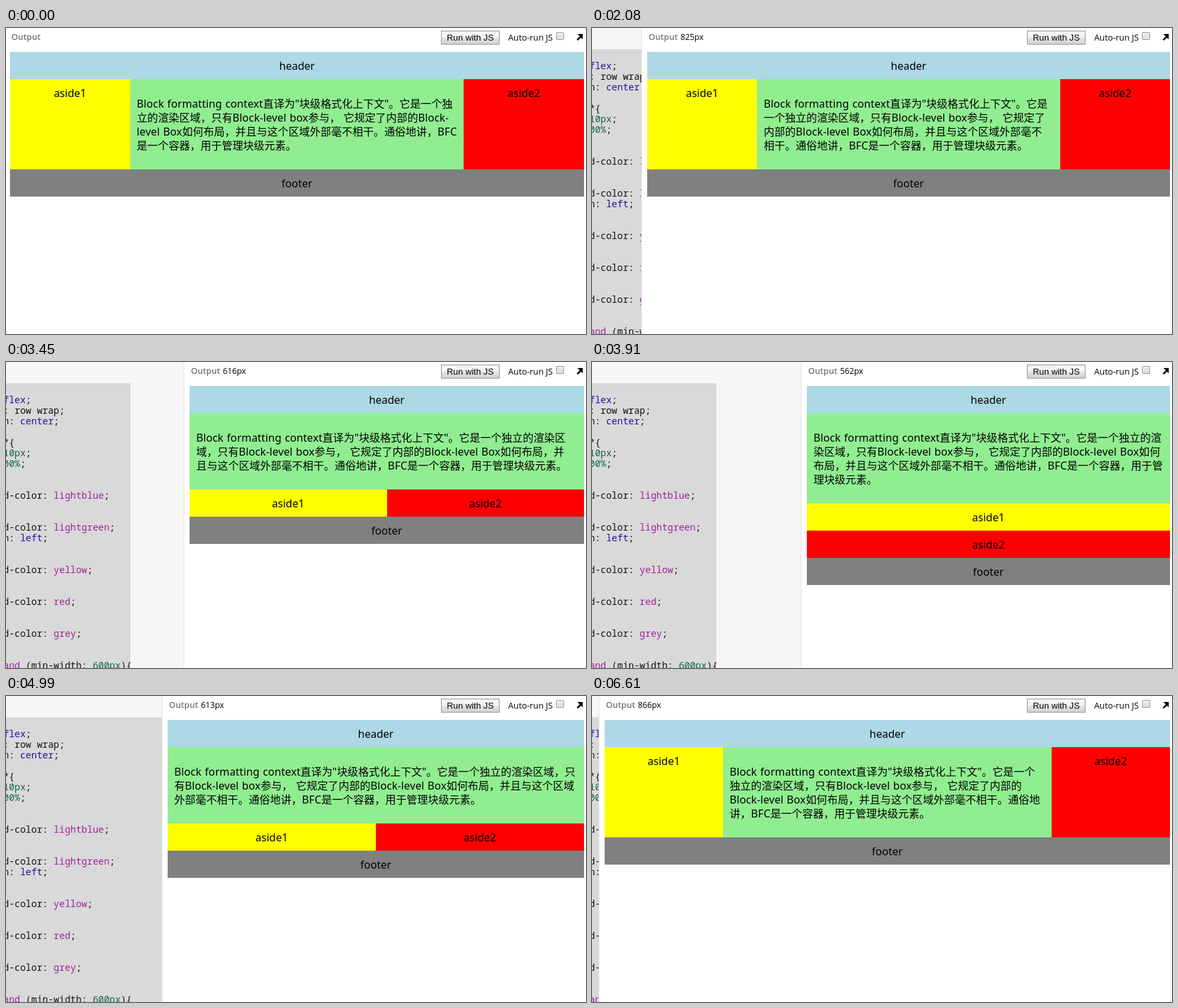
An HTML page that plays this animation: 872x461 px, repeating every 7.34 s.

```html
<!DOCTYPE html>
<html lang="zh-CN">
<head>
<meta charset="utf-8">
<title>Responsive flex layout</title>
<style>
html, body { margin: 0; width: 100%; height: 100%; overflow: hidden; background: #fff; }
#stage { position: relative; width: 872px; height: 461px; overflow: hidden; background: #f7f7f7; }
#stage > * { position: absolute; }

#select { left: 0; top: 32px; height: 429px; background: #d9d9d9; }
#code div {
  position: absolute; left: -4px; white-space: pre; color: #111;
  font: 14px/16px "Noto Sans Mono", monospace;
}
#code .a { color: #219; }
#code .k { color: #a0219a; }
#code .n { color: #164; }

#panel { top: 0; width: 900px; height: 461px; background: #fff; border-left: 1px solid #e2e2e2; }
#title { top: 4px; white-space: pre; color: #777; font: 600 12.7px/19px "Open Sans", sans-serif; }
#size { color: #000; font-weight: 400; font-size: 12.3px; margin-left: 4px; }

#run {
  left: 654px; top: 4px; width: 88px; height: 21px; box-sizing: border-box;
  border: 1px solid #8b9a9a; background: linear-gradient(#f4f4f4 0 48%, #e4e4e4 52%, #d2d2d2);
  font: 13.2px/19px "Liberation Sans", Arial, sans-serif; text-align: center; color: #000;
}
#auto { left: 755px; top: 5px; color: #000; white-space: nowrap; font: 12.8px/19px "Open Sans", sans-serif; }
#box {
  left: 827px; top: 6px; width: 12px; height: 12px; box-sizing: border-box;
  border: 1px solid #999; border-radius: 2px; background: linear-gradient(#eee, #ddd);
}
#arrow { left: 856px; top: 7px; }

#page {
  top: 36px; display: flex; flex-flow: row wrap; text-align: center; color: #000;
  font: 16px/21px "Noto Sans", "Noto Sans CJK SC", sans-serif; text-spacing-trim: space-all;
}
#page > * { padding: 11px 10px 9px; flex: 1 100%; box-sizing: content-box; min-width: 0; white-space: nowrap; }
header { background: lightblue; }
main { background: lightgreen; text-align: left; }
main p { margin: 16px 0; }
main p div { height: 21px; white-space: pre; }
main p span { letter-spacing: .1px; word-spacing: .8px; }
.one { background: yellow; }
.two { background: red; }
footer { background: grey; order: 4; }
#page.mid aside, #page.wide aside { flex: 1 0; }
#page.wide main { flex: 3 0; order: 2; }
#page.wide .one { order: 1; }
#page.wide .two { order: 3; }
</style>
</head>
<body>
<div id="stage">
  <div id="select"></div>
  <div id="code"></div>
  <div id="panel"></div>
  <div id="title">Output<span id="size"></span></div>
  <div id="page">
    <header>header</header>
    <main><p id="text"></p></main>
    <aside class="one">aside1</aside>
    <aside class="two">aside2</aside>
    <footer>footer</footer>
  </div>
  <div id="run">Run with JS</div>
  <div id="auto">Auto-run JS</div>
  <div id="box"></div>
  <svg id="arrow" width="13" height="13"><path d="M3 2h8v8l-2.6-2.6-4.6 4.6-1.8-1.8 4.6-4.6z"/></svg>
</div>
<script>
const $ = id => document.getElementById(id);
const LOOP = 7340, FIRST = 1446, STEP = 77;

// Divider position at chosen drag steps
const path = [[-1, -3], [0, -2], [3, 16], [9, 85], [14, 142], [16, 164], [19, 184], [24, 260],
  [26, 267], [29, 304], [30, 314], [35, 314], [38, 293], [40, 293], [44, 263], [45, 249],
  [46, 234], [55, 107], [59, 10]];

function divider(n) {
  if (n < 0) return path[0][1];
  const i = path.findIndex(k => k[0] >= n);
  if (i < 0) return path[path.length - 1][1];
  const [a, x] = path[i - 1], [b, y] = path[i];
  return Math.round(x + (y - x) * (n - a) / (b - a));
}

// Code lines: row number and marked-up text
const code = [
  [0, "<a>flex</a>;"], [1, ": row wrap;"], [2, "n: <a>center</a>;"],
  [4, "*{"], [5, "<n>10px</n>;"], [6, "<n>00%</n>;"],
  [9, "d-color: <k>lightblue</k>;"], [12, "d-color: <k>lightgreen</k>;"], [13, "n: <a>left</a>;"],
  [16, "d-color: <k>yellow</k>;"], [19, "d-color: <k>red</k>;"], [22, "d-color: <k>grey</k>;"],
  [25, "<k>and</k> (min-width: <n>600px</n>){"]
];
$("code").innerHTML = code.map(([row, s]) =>
  `<div style="top:${49 + 16 * row}px">` +
  s.replace(/<(\w)>/g, '<span class="$1">').replace(/<\/\w>/g, "</span>") + "</div>").join("");

const text = 'Block formatting context直译为"块级格式化上下文"。它是一个独立的渲染区域，' +
  '只有Block-level box参与， 它规定了内部的Block-level Box如何布局，' +
  '并且与这个区域外部毫不相干。通俗地讲，BFC是一个容器，用于管理块级元素。';
const tokens = text.match(/[A-Za-z]+-?|为"块|[^\x00-\x7f][，。"]*| /g);
const words = { Block: 41, formatting: 82, context: 57, "Block-": 48.2, level: 35, box: 28, Box: 28, BFC: 29.5 };
const advance = s => words[s] ||
  [...s].reduce((w, c) => w + (c === " " ? 5 : c === '"' ? 6.5 : 16), 0);

function wrap(room) {
  const lines = [""];
  let used = 0;
  for (const s of tokens) {
    const w = advance(s);
    if (used + w > room && s !== " ") {
      lines.push("");
      used = 0;
    }
    lines[lines.length - 1] += s;
    used += w;
  }
  return lines.map(l => "<div>" + l.replace(/[A-Za-z -]+/g, "<span>$&</span>") + "</div>").join("");
}

function draw(n) {
  const x = divider(n), view = 876 - x, width = 860 - x;
  const mode = view >= 800 ? "wide" : view >= 600 ? "mid" : "narrow";
  $("select").style.width = (n < 34 ? 187 : 400) + "px";
  $("panel").style.left = x + "px";
  $("panel").style.borderColor = n === 65 || n === 66 ? "#ccc" : "#e2e2e2";
  $("title").style.left = x + 11 + "px";
  $("size").textContent = n < 2 ? "" : 876 - divider(n - 2) + "px";
  $("page").className = mode;
  $("page").style.left = x + 9 + "px";
  $("page").style.width = width + "px";
  $("text").innerHTML = wrap(mode === "wide" ? (width - 60) * .6 : width - 20);
}

const start = performance.now();
let shown = null;
function tick() {
  const t = (performance.now() - start) % LOOP;
  const n = Math.max(-1, Math.floor((t - FIRST) / STEP));
  if (n !== shown) draw(shown = n);
  requestAnimationFrame(tick);
}
tick();
</script>
</body>
</html>
```
